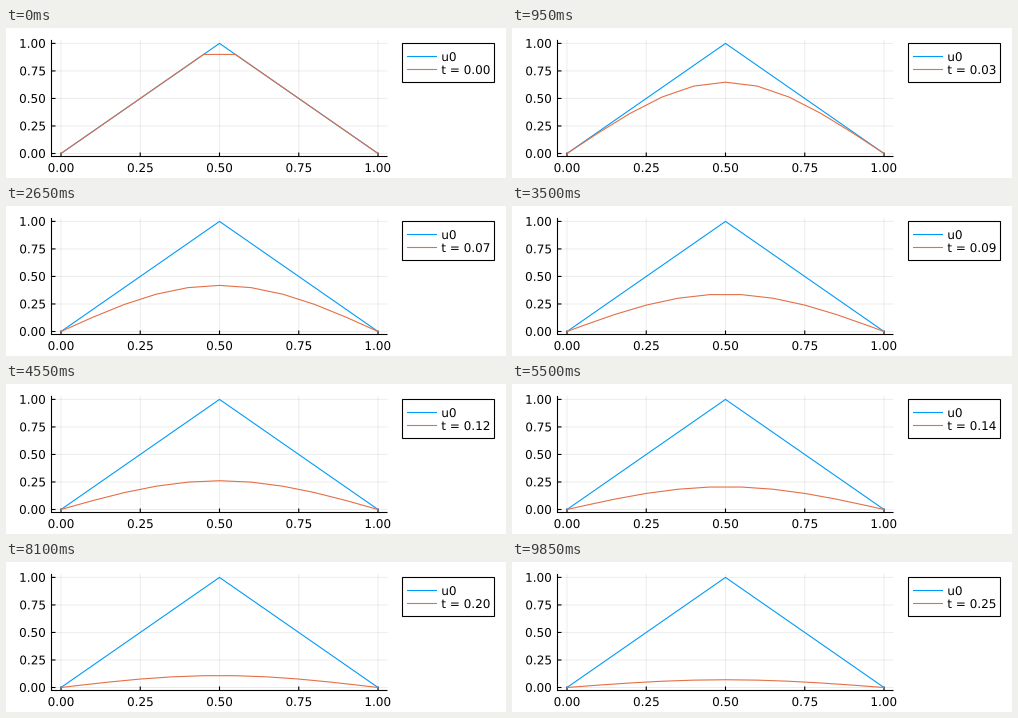
Recreate the animation shown at these times as a matplotlib script. Size 500x150 px, loop 9900 ms.

```python
import numpy as np
import matplotlib.pyplot as plt
from matplotlib.animation import FuncAnimation
from matplotlib.patches import PathPatch, Rectangle
from matplotlib.textpath import TextPath
from matplotlib.transforms import Affine2D

W, H, DPI = 500, 150, 100
FRAMES, INTERVAL = 198, 50
CELLS = 10
DT = 1 / 800  # half-cell averaging step: (dx / 2)^2 / 2
FONT_PX = 12
BLUE, ORANGE = "#009afa", "#e36f47"
X0, X1, Y0, Y1 = 55.0, 372.0, 125.5, 15.4
LEFT, RIGHT, TOP, BOTTOM = 45.5, 381.5, 11.9, 128.5

plt.rcParams["font.family"] = "DejaVu Sans"


def px(x):
    return X0 + (X1 - X0) * np.asarray(x)


def py(y):
    return Y0 + (Y1 - Y0) * np.asarray(y)


fig = plt.figure(figsize=(W / DPI, H / DPI), dpi=DPI, facecolor="white")
ax = fig.add_axes([0, 0, 1, 1])
ax.set_xlim(0, W)
ax.set_ylim(H, 0)
ax.axis("off")


def line(xs, ys, color="black", width=1.1, **kw):
    return ax.plot(xs, ys, color=color, lw=width * 72 / DPI, snap=False,
                   solid_capstyle="butt", **kw)[0]


def outline(text):
    return TextPath((0, 0), text, size=FONT_PX)


def label(x, y, text, align=0.0):
    """Place text as an outline; align is the share of its width left of x."""
    path = outline(text)
    box = path.get_extents()
    shift = align * (box.x0 + box.x1) if align == 0.5 else align * box.x1
    place = Affine2D().scale(1, -1).translate(x - shift, y)
    patch = PathPatch(path, fc="black", lw=0, snap=False, zorder=5,
                      transform=place + ax.transData)
    return ax.add_patch(patch)


# Grid, ticks and tick labels
for v in np.linspace(0, 1, 5):
    gx, gy = px(v), py(v)
    line([gx, gx], [TOP, BOTTOM], width=1, alpha=0.07, zorder=1)
    line([LEFT, RIGHT], [gy, gy], width=1, alpha=0.07, zorder=1)
    line([gx, gx], [BOTTOM, BOTTOM - 4], zorder=2)
    line([LEFT, LEFT + 4], [gy, gy], zorder=2)
    label(gx, 144, f"{v:.2f}", 0.5)
    label(39, gy + 4.4, f"{v:.2f}", 1.0)

line([LEFT, LEFT], [TOP, BOTTOM + 0.5], zorder=2)
line([LEFT - 0.5, RIGHT], [BOTTOM, BOTTOM], zorder=2)

# Legend
ax.add_patch(Rectangle((396.5, 15.5), 92, 39, fc="white", ec="black",
                       lw=1.1 * 72 / DPI, snap=False, zorder=2))
line([401, 431], [28.5, 28.5], BLUE, zorder=3)
line([401, 431], [41.5, 41.5], ORANGE, zorder=3)
label(435.3, 33, "u0")
time_label = label(435.3, 46, "t = 0.00")

# Initial tent and the diffusing profile
line(px([0, 0.5, 1]), py([0, 1, 0]), BLUE, zorder=3)
curve = line([], [], ORANGE, zorder=4)


def diffuse(steps):
    """Average neighbours onto a grid that alternates by half a cell."""
    x = np.linspace(0, 1, CELLS + 1)
    mid = (x[:-1] + x[1:]) / 2
    u = 1 - np.abs(2 * x - 1)
    for _ in range(steps // 2):
        half = (u[:-1] + u[1:]) / 2
        u[1:-1] = (half[:-1] + half[1:]) / 2
    if steps % 2:
        x = np.concatenate(([0], mid, [1]))
        u = np.concatenate(([0], (u[:-1] + u[1:]) / 2, [0]))
    return x, u


def draw(i):
    step = i + 1
    x, u = diffuse(step)
    curve.set_data(px(x), py(u))
    time_label.set_path(outline(f"t = {step * DT + 1e-9:.2f}"))
    return curve, time_label


anim = FuncAnimation(fig, draw, frames=FRAMES, interval=INTERVAL,
                     repeat=True, repeat_delay=0)
plt.show()
```
